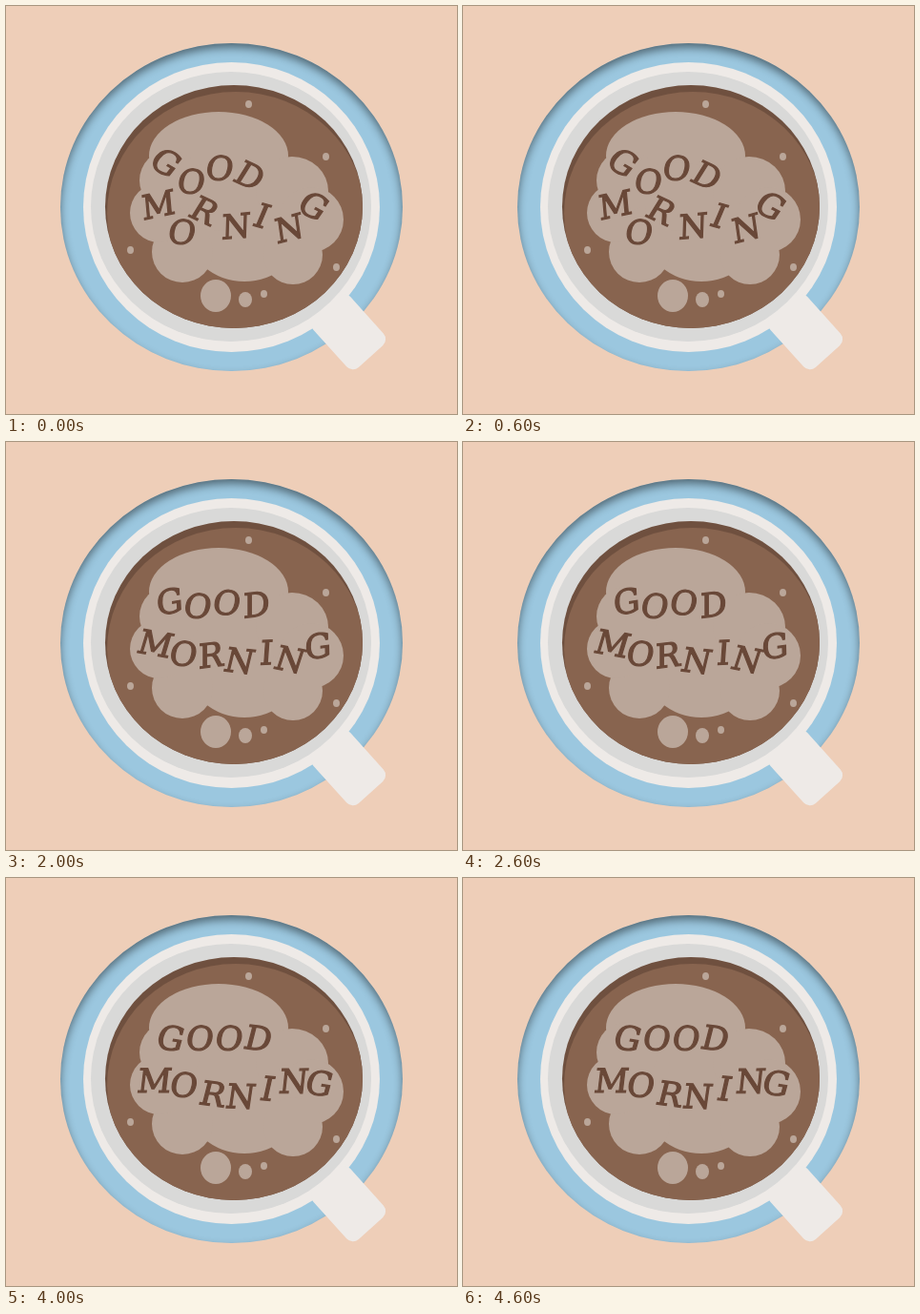
Recreate the animation shown at these times as an HTML page with a canvas. Size 473x428 px, loop 5000 ms.

```html
<!DOCTYPE html>
<html lang="en">
<head>
<meta charset="utf-8">
<title>Good morning coffee</title>
<style>
  html, body { margin: 0; width: 100%; height: 100%; overflow: hidden; background: #eeceb8; }
  canvas { display: block; }
</style>
</head>
<body>
<canvas id="stage" width="473" height="428"></canvas>
<script>
const ctx = document.getElementById('stage').getContext('2d');
const STEP = 1000, STEPS = 5, TAU = Math.PI * 2;
const COLORS = {
  table: '#eeceb8', saucer: '#9bc7df', cup: '#eeeae7', rim: '#d9d9d8',
  coffee: '#88644f', shade: '#6f503f', foam: '#baa699', ink: '#694838'
};

// x, y, rx, and ry where it is not a circle
const foam = [
  [223, 157, 73, 46], [250, 235, 60, 54], [225, 200, 60, 36],
  [300, 194, 38, 36], [320, 224, 34], [301, 261, 31],
  [185, 258, 32], [161, 217, 31], [172, 183, 32],
  [220, 304, 16, 17], [251, 308, 7, 8]
];
const bubbles = [[270.5, 302], [254.5, 103], [335.5, 158], [346.5, 274], [130.5, 256]];

// Each word has a resting line and the scatter its letters start from:
// dx, dy, tilt in degrees, and optionally how fast the letter settles.
const words = [
  {
    text: 'GOOD',
    place: i => [173 + 30.6 * i, 168],
    scatter: [[-5, -4, 28], [-9, 16, 0], [-10, 2, 0], [-9, 10, 22]]
  },
  {
    text: 'MORNING',
    place: i => [
      156 + 28.8 * i + 4 * Math.sin(Math.PI * i / 6),
      221 + 8.5 * Math.cos((i - 2.7) * 1.21)
    ],
    scatter: [
      [4, -4, -15], [-2, 20, 0], [-9, -12, 22], [-5, 2, -8],
      [-6, -1, 13], [-5, 20, -18, 0.4], [-6, -6, 25]
    ]
  }
];

function ellipse(x, y, rx, ry, color) {
  ctx.beginPath();
  ctx.ellipse(x, y, rx, ry, 0, 0, TAU);
  ctx.fillStyle = color;
  ctx.fill();
}

function drawSaucer() {
  ellipse(236.5, 211, 179.5, 172, COLORS.saucer);
  ctx.save();
  ctx.clip();
  ctx.shadowColor = 'rgba(0, 0, 0, .48)';
  ctx.shadowBlur = 10;
  ctx.shadowOffsetY = 5;
  ctx.beginPath();
  ctx.rect(-100, -100, 673, 628);
  ctx.ellipse(236.5, 211, 180, 172.5, 0, 0, TAU);
  ctx.fill('evenodd');
  ctx.restore();
}

function drawHandle() {
  ctx.save();
  ctx.translate(341, 321.5);
  ctx.rotate(48 * Math.PI / 180);
  ctx.beginPath();
  ctx.roundRect(-8, -26, 70, 52, 9);
  ctx.fillStyle = COLORS.cup;
  ctx.fill();
  ctx.restore();
}

function drawCoffee() {
  ellipse(239, 210.5, 135, 127.5, COLORS.shade);
  ctx.save();
  ctx.clip();
  ellipse(241, 217.5, 135, 127.5, COLORS.coffee);
  ctx.restore();
}

function drawLetter(char, x, y, tilt) {
  ctx.save();
  ctx.translate(x, y);
  ctx.rotate(tilt * Math.PI / 180);
  ctx.transform(1, 0, -0.12, 1, 0, 0);
  ctx.fillText(char, 0, 12.5);
  ctx.strokeText(char, 0, 12.5);
  ctx.restore();
}

// Letters drift to their line while their tilt swings out.
function drawWord({ text, place, scatter }, step) {
  const left = 1 - step / (STEPS - 1);
  const swing = Math.exp(-0.4 * step) * Math.cos(Math.PI * step / 2);
  scatter.forEach(([dx, dy, tilt, pace = 2], i) => {
    const [x, y] = place(i);
    const away = left ** pace;
    drawLetter(text[i], x + dx * away, y + dy * away, 3 + tilt * swing);
  });
}

function draw(step) {
  ctx.fillStyle = COLORS.table;
  ctx.fillRect(0, 0, 473, 428);
  drawSaucer();
  ellipse(236.5, 211, 155.5, 152, COLORS.cup);
  ellipse(236, 210.5, 147, 141.5, COLORS.rim);
  drawHandle();
  drawCoffee();
  foam.forEach(([x, y, rx, ry = rx]) => ellipse(x, y, rx, ry, COLORS.foam));
  bubbles.forEach(([x, y]) => ellipse(x, y, 3.5, 4, COLORS.foam));
  ctx.font = '35px "DejaVu Serif", serif';
  ctx.textAlign = 'center';
  ctx.lineWidth = 1.2;
  ctx.fillStyle = ctx.strokeStyle = COLORS.ink;
  words.forEach(word => drawWord(word, step));
}

const start = performance.now();
let shown = -1;
function tick() {
  const step = Math.floor((performance.now() - start) / STEP) % STEPS;
  if (step !== shown) draw(shown = step);
  requestAnimationFrame(tick);
}
tick();
</script>
</body>
</html>
```
